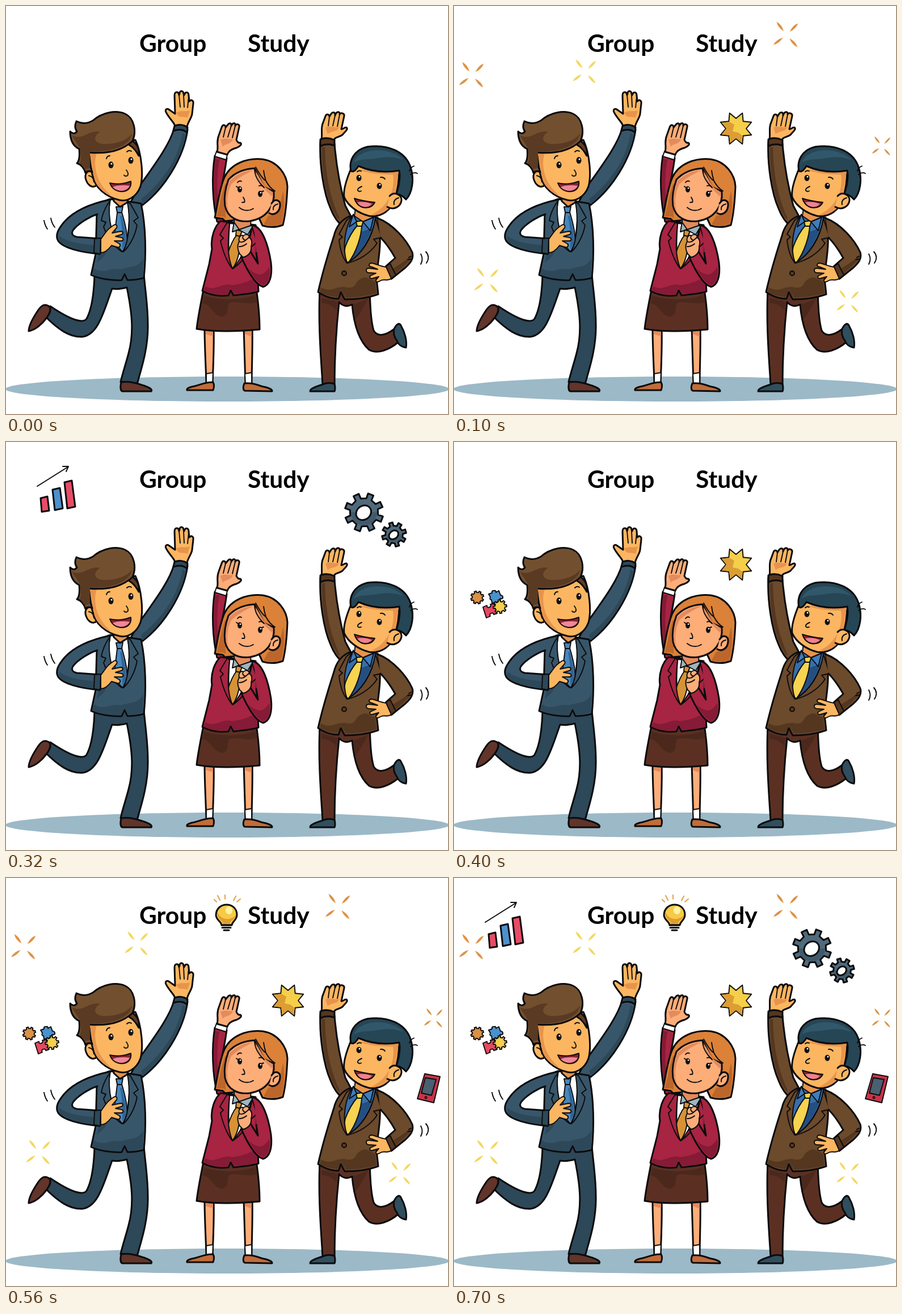
An HTML page for the animation above (0.8 s loop, 779 px wide and 719 px high).

```html
<!DOCTYPE html>
<html lang="en">
<head>
<meta charset="utf-8">
<title>Group Study</title>
<style>
html, body { margin: 0; width: 100%; height: 100%; overflow: hidden; background: #fff; }
svg { display: block; }
path, circle, ellipse, polygon { stroke: #0b0b0d; stroke-width: 3; stroke-linejoin: round; stroke-linecap: round; }
.flat, .flat * { stroke: none; }
.thin, .thin * { stroke-width: 1.9; }
.line, .line * { fill: none; }
.blue { fill: #38566a; } .blueDark { fill: #2d4858; }
.skin { fill: #fcb661; } .skinDark { fill: #e7944d; }
.rose { fill: #fcad78; } .roseDark { fill: #e38b5c; }
.wine { fill: #a72442; } .wineDark { fill: #851b36; }
.brown { fill: #6c4a2c; } .brownDark { fill: #553720; }
.choc { fill: #5b3022; } .chocDark { fill: #4c281c; }
.navy { fill: #264655; } .white { fill: #fff; }
text { font: bold 42.5px Carlito, Lato, sans-serif; }
</style>
</head>
<body>
<svg width="779" height="719" viewBox="0 0 779 719">
<ellipse class="flat" cx="390" cy="675" rx="391" ry="22" fill="#9cb9c7"/>
<text x="235" y="81">Group</text>
<text x="426" y="81">Study</text>

<g id="leftMan">
  <path class="blue" d="M296 216C290 240 268 272 236 316L220 345L239 352C276 325 313 270 320 218"/>
  <path class="flat blueDark" d="M317 228C309 270 276 322 241 349L238 340C276 310 304 270 311 224Z"/>
  <path class="blueDark" d="M295 220L297 211C304 207 313 209 320 214L319 223C312 217 304 217 295 220Z"/>
  <path class="skin" d="M298 211C295 204 288 198 283 189C279 183 283 179 288 183L298 190L297 158C297 150 304 150 305 157L306 154C306 148 313 149 313 155L314 157C316 150 322 151 322 158L323 168C326 164 331 166 330 172L328 190C327 198 321 203 319 213C313 209 304 208 298 211Z"/>
  <path class="flat skinDark" d="M300 188C308 183 317 187 324 184L320 197C312 193 305 200 300 188Z"/>
  <path class="line thin" d="M305 157L307 178M313 157L314 178M322 160L320 179"/>

  <path class="blueDark" d="M156 474C155 505 152 533 142 551C136 560 115 554 78 529L68 546C92 570 112 584 134 583C162 580 172 540 187 498C195 500 205 498 213 496C222 540 226 575 216 612C210 635 205 648 202 663C212 661 222 664 231 666C240 635 251 600 250 560C250 530 246 505 243 474Z"/>
  <path fill="#62342a" d="M77 530C68 523 62 528 56 537C46 552 40 564 40 573C52 571 64 560 72 549C77 542 80 536 77 530Z"/>
  <path fill="#62342a" d="M203 663C201 672 202 678 205 679L256 679C259 675 250 671 240 668C230 664 215 661 203 663Z"/>

  <path class="blue" d="M184 340C172 344 162 350 160 365L158 437L150 474C165 481 188 484 204 483L209 472L214 483C225 483 236 481 243 479C247 440 247 390 238 348L213 344Z"/>
  <path class="flat blueDark" d="M154 462C172 474 185 460 202 464C218 458 234 462 242 444L241 476C230 480 222 481 216 481L209 470L203 481C185 482 165 478 153 473ZM163 437L178 432C173 444 165 448 160 452Z"/>
  <path class="white thin" d="M184 341C176 378 188 420 206 433C217 410 219 370 215 345Z"/>
  <path class="thin" fill="#4887bd" d="M196 364L204 363C210 383 215 405 213 418L206 433C196 426 191 416 191 405Z"/>
  <path class="flat" fill="#316594" d="M201 370C205 390 206 412 205 430L211 418C213 404 208 385 204 370Z"/>
  <path class="thin" fill="#4887bd" d="M194 354L206 353L204 364L196 364Z"/>
  <path class="blue thin" d="M214 346L219 348L233 373L225 379L231 386C227 408 216 425 207 433C218 408 219 372 214 346ZM183 343C175 355 170 365 168 378L176 381L172 389C178 407 191 424 204 433C187 410 179 375 183 343Z"/>

  <path class="blue" d="M161 367C145 372 126 385 119 394C114 401 117 405 125 407L166 410L165 437C130 434 100 426 92 414C86 404 92 393 103 380C120 361 150 348 184 341"/>
  <path class="flat blueDark" d="M94 405C110 418 140 420 164 422L163 435C132 432 104 425 94 414Z"/>
  <path class="blueDark thin" d="M156 410L167 409L166 437L155 435Z"/>
  <path class="skin thin" d="M167 411L175 400C178 395 184 390 190 386C195 383 198 389 193 393L187 400L202 397C207 397 207 402 203 403L193 406L204 408C208 410 207 414 203 414L191 414L200 419C203 422 200 426 196 425L186 422C180 430 174 435 167 435Z"/>

  <path class="skinDark" d="M189 332L190 344L201 354L214 346L215 336Z"/>
  <path class="skin" d="M158 296C148 286 139 292 140 303C143 316 152 322 160 316"/>
  <path class="line thin" d="M146 299Q154 300 155 310"/>
  <path class="skin" d="M146 255C148 275 150 290 153 300C157 320 175 336 200 342C214 345 230 337 237 318C242 300 240 262 228 236Z"/>
  <path class="flat skinDark" d="M148 259L160 259C153 280 158 312 186 334C170 328 157 316 155 301Z"/>
  <path fill="#5d3d25" d="M221 236C231 243 236 251 234 264C230 257 226 250 216 244Z"/>
  <path fill="#72502f" d="M145 258C147 275 149 285 152 293C146 289 141 292 140 294C137 283 131 279 125 277C130 272 130 262 129 252C118 247 113 236 113 221C118 226 122 225 125 221C121 216 121 210 124 203C136 209 146 206 153 202C170 187 194 183 210 190C227 198 230 222 223 238C208 252 185 262 145 258Z"/>
  <path class="flat" fill="#5a3a22" d="M116 228C135 238 148 216 166 222C152 230 155 243 172 243C192 244 212 238 222 225C220 244 190 259 148 256L148 285L139 288L130 276C134 266 131 256 130 250Z"/>
  <g class="flat" fill="#111"><ellipse cx="185" cy="280" rx="4.5" ry="6"/><ellipse cx="220" cy="272" rx="4.5" ry="6"/></g>
  <g class="flat white"><circle cx="186" cy="278" r="1.5"/><circle cx="221" cy="270" r="1.5"/></g>
  <path class="line thin" d="M177 269Q178 264 183 264M213 257Q217 253 221 256M212 289Q217 295 214 299Q210 301 208 298"/>
  <path class="thin" fill="#8c2330" d="M183 312C195 315 210 313 220 309C222 322 212 328 202 327C192 326 186 320 183 312Z"/>
  <path class="flat" fill="#ed899a" d="M188 319C198 315 210 316 218 317C212 328 196 328 188 319Z"/>

  <path class="line thin" d="M67 378Q69 388 73 393M79 374Q81 384 86 390"/>
</g>

<g id="woman">
  <path class="wine" d="M368 264C362 300 364 345 372 380L400 385L377 332C382 310 386 290 389 268"/>
  <path class="flat wineDark" d="M369 270L376 270C370 305 372 340 378 372L374 376C366 342 365 305 369 270Z"/>
  <path class="white thin" d="M371 256L390 262L388 271L368 265Z"/>
  <path class="rose" d="M372 257C375 248 370 240 375 228L380 214C382 208 387 209 387 214L391 209C394 205 398 207 397 211C400 205 405 205 404 211C407 206 412 209 411 213L406 236C408 240 410 242 413 241C417 243 412 248 406 250C398 252 392 256 390 262Z"/>
  <path class="flat roseDark" d="M378 236C386 231 394 236 400 234C398 244 386 242 382 248Z"/>
  <path class="line thin" d="M387 214L383 231M397 211L391 231M404 211L399 232"/>

  <path class="rose" d="M350 568C350 600 352 630 353 665L364 665C365 640 367 600 366 568ZM419 568L422 666L433 666C433 640 435 600 434 568Z"/>
  <path class="flat roseDark" d="M352 572H365V582L352 578ZM421 572H433V583L421 578Z"/>
  <path class="white thin" d="M353 648L365 646L364 665L353 665ZM421 648L433 646L433 666L422 666Z"/>
  <path fill="#c26c3a" d="M365 663C352 662 345 667 332 670C322 672 318 674 319 677L365 677C367 672 367 667 365 663ZM420 665C417 672 418 677 421 678L469 679C470 675 460 672 450 670C440 666 430 664 420 665Z"/>
  <path class="choc" d="M348 500C343 525 338 550 336 569C370 575 415 573 447 570C447 545 445 525 441 498Z"/>
  <path class="flat chocDark" d="M349 510C380 520 420 518 440 508L442 522C420 528 408 518 393 524C388 535 395 545 380 548C365 545 360 525 346 524Z"/>

  <path class="wine" d="M378 379C368 388 360 408 363 428L358 455L346 502C360 510 378 512 392 510L396 501L401 510C418 508 434 507 445 503L443 470L440 386Z"/>
  <path class="flat wineDark" d="M352 494C370 504 381 486 398 492C418 490 430 484 441 478L443 501C430 505 415 507 403 508L396 498L390 508C372 510 358 506 348 501Z"/>
  <path class="white thin" d="M394 383C393 405 389 440 400 463C414 450 428 410 434 387Z"/>
  <path class="thin" fill="#d69335" d="M406 404L412 405C413 425 411 446 400 462C392 456 389 446 391 436C396 420 400 412 406 404Z"/>
  <path class="thin" fill="#d69335" d="M406 394L416 397L412 406L405 404Z"/>
  <path class="thin" fill="#9db6bf" d="M402 381L399 398L410 394L426 403L435 388Z"/>
  <path class="wine thin" d="M390 381L377 403L383 409L378 414C383 435 391 453 399 463C388 436 392 408 394 384ZM434 390L442 416L432 425C424 442 411 455 400 463C418 440 430 414 434 390Z"/>
  <path class="wine" d="M437 387C452 392 462 420 467 452C470 478 464 492 453 495C440 492 425 466 415 443L431 433L444 454L441 435"/>
  <path class="flat wineDark" d="M464 460C467 478 461 490 453 492C444 489 434 475 427 462C444 478 454 476 464 460Z"/>
  <path class="rose thin" d="M412 437C407 428 408 420 411 415C409 408 414 402 418 405C424 400 430 404 428 408C434 410 434 418 432 424C433 434 428 440 418 443Z"/>
  <path class="line thin" d="M411 415Q417 418 422 413M418 405Q415 410 422 413L428 408M411 424Q418 424 424 419"/>

  <path fill="#db8138" d="M368 373C373 350 376 322 385 302C396 278 425 267 452 270C480 274 495 298 496 318C495 345 492 370 488 386C475 391 462 390 452 387L446 374L386 379L382 375Z"/>
  <path class="flat" fill="#bd662b" d="M371 371C378 350 380 325 387 312L387 374L383 371ZM462 370C478 366 484 350 488 326C493 345 489 370 486 384C474 388 462 388 454 385Z"/>
  <path class="roseDark thin" d="M403 372L402 381L411 394L431 387L432 374Z"/>
  <path class="rose" d="M392 306C404 293 420 287 438 286L455 319L472 327C474 352 460 374 430 379C408 382 390 372 386 352C384 338 387 320 392 306Z"/>
  <path class="flat roseDark" d="M393 309C405 297 420 290 436 289C420 297 408 304 397 314C389 330 388 350 393 364C386 354 386 328 393 309ZM440 291L457 319L470 328L469 336C458 326 446 314 440 291Z"/>
  <path class="rose" d="M468 348C474 338 484 342 483 352C482 364 472 370 464 365"/>
  <path class="line thin" d="M479 349Q470 351 471 359M438 286Q438 304 455 320M440 284Q451 304 458 308Q455 298 454 290M458 308Q465 321 474 326"/>
  <g class="flat" fill="#111"><ellipse cx="412" cy="323" rx="4" ry="5.5"/><ellipse cx="448" cy="331" rx="4" ry="5.5"/></g>
  <g class="flat white"><circle cx="413" cy="321" r="1.3"/><circle cx="449" cy="329" r="1.3"/></g>
  <path class="line thin" d="M409 320L406 318M451 327L454 326M408 311Q411 307 415 309M446 317Q450 315 454 319M418 337Q422 343 420 346L416 346M411 355C418 361 428 362 436 357"/>
</g>

<g id="rightMan">
  <path class="brown" d="M554 239C552 280 560 330 572 357C577 370 585 382 595 390L612 378L598 352C588 315 582 280 579 243"/>
  <path class="flat brownDark" d="M557 248L562 249C563 300 572 340 588 374L586 376C566 350 556 300 557 248Z"/>
  <path class="brownDark" d="M554 235C562 231 572 232 579 236L579 246C571 243 562 243 554 247Z"/>
  <path class="skin" d="M556 234C558 225 554 215 559 205L563 194C565 189 570 191 570 195L573 190C576 186 581 187 580 193C582 185 589 185 588 191C590 187 597 189 596 194L591 217C594 218 596 213 600 214C604 217 597 222 593 227C587 232 580 230 578 236C570 232 563 232 556 234Z"/>
  <path class="flat skinDark" d="M563 214C571 210 579 215 587 213C584 224 573 219 567 226Z"/>
  <path class="line thin" d="M570 195L568 211M580 193L576 211M588 191L584 212"/>

  <path class="choc" d="M553 500C550 560 555 620 558 667C565 664 572 664 579 667C579 615 582 570 587 522C595 530 603 530 610 526C613 560 622 590 640 606C655 614 675 606 692 592L683 570C670 580 655 584 648 572C643 555 642 530 641 500Z"/>
  <path class="flat chocDark" d="M556 514L584 521L583 536C574 528 564 522 556 524ZM612 526L638 516C628 536 620 548 616 552Z"/>
  <path fill="#304f5e" d="M558 667C548 670 535 674 536 679L579 679C581 674 580 670 579 666C570 663 564 664 558 667ZM684 569C688 561 693 557 696 563C703 575 707 590 705 602C698 601 692 598 689 590C684 583 682 577 684 569Z"/>

  <path class="brown" d="M604 371C590 378 582 388 578 405C570 430 560 460 550 504C563 513 576 516 586 516L590 504L597 517C618 517 640 514 656 508L653 480C655 450 662 425 658 392L655 373Z"/>
  <path class="flat brownDark" d="M555 496C575 507 582 491 602 496C622 498 610 482 634 478L651 486L653 506C638 511 618 514 599 514L590 500L584 513C570 512 560 508 553 503Z"/>
  <path class="thin" fill="#356fad" d="M611 369C597 388 590 425 601 453C625 440 645 410 652 372Z"/>
  <path class="flat" fill="#244f81" d="M645 392C636 418 622 438 605 449L625 398Z"/>
  <path class="thin" fill="#f7d351" d="M619 387L627 388C626 404 619 432 603 453C596 446 595 434 598 424C604 408 611 396 619 387Z"/>
  <path class="thin" fill="#f7d351" d="M617 380L630 378L627 388L619 388Z"/>
  <path class="thin" fill="#3f7dbd" d="M612 367L605 389L618 380ZM648 372L642 396L629 380Z"/>
  <path class="brown thin" d="M610 370L600 378L587 402L593 407L587 412C589 430 594 445 601 453C591 422 599 388 610 370ZM651 374L662 408L648 411L654 418C642 436 621 449 601 453C628 438 646 408 651 374Z"/>
  <circle class="brownDark thin" cx="596" cy="471" r="4"/>
  <path class="brown" d="M655 374C682 384 706 412 716 434C719 444 714 452 704 461L679 481L669 459L686 444C677 428 668 416 660 408"/>
  <path class="flat brownDark" d="M714 439C714 451 698 460 680 478L675 467C692 456 704 450 714 439Z"/>
  <path class="brownDark thin" d="M668 460L677 454L687 474L679 481Z"/>
  <path class="line thin" d="M710 443L714 441M708 447L713 446"/>
  <path class="skin thin" d="M670 460C660 459 652 454 644 453C638 454 639 459 645 460L655 464L639 462C633 463 634 469 639 470L652 471L643 475C639 478 642 481 646 480L657 477L652 483C651 487 656 487 660 484C668 480 672 486 679 480Z"/>

  <path class="skinDark thin" d="M616 356L614 370L629 380L648 372L647 364Z"/>
  <path class="skin" d="M610 282C600 305 594 325 596 337C603 352 620 365 640 370C660 373 680 360 685 340C692 320 693 300 693 286Z"/>
  <path class="flat skinDark" d="M620 288L692 292L684 340C680 358 660 371 644 368C676 352 686 322 682 297C660 297 638 295 620 288Z"/>
  <path class="navy" d="M608 291C604 274 612 254 637 248C672 243 704 256 713 284C720 305 716 330 705 341C700 335 694 332 688 331C692 318 696 302 693 290C670 294 644 292 621 282C617 289 612 293 608 291Z"/>
  <path class="flat" fill="#31576a" d="M613 276C618 259 645 250 672 256C684 259 694 264 700 271C686 266 672 265 656 268C640 271 624 268 613 276Z"/>
  <path class="skin" d="M676 335C684 326 698 332 697 343C695 355 682 360 672 354"/>
  <path class="line thin" d="M692 338Q682 341 684 350M711 291Q712 285 719 282M713 297Q719 292 725 295"/>
  <g class="flat" fill="#111"><ellipse cx="622" cy="303" rx="4.5" ry="5.5"/><ellipse cx="658" cy="317" rx="4.5" ry="5.5"/></g>
  <g class="flat white"><circle cx="623" cy="301" r="1.4"/><circle cx="659" cy="315" r="1.4"/></g>
  <path class="line thin" d="M619 292Q622 289 626 291M660 302Q665 301 668 305M627 318Q619 321 620 325Q622 328 626 326"/>
  <path class="thin" fill="#8c2330" d="M614 339C625 343 640 345 650 346C645 356 635 357 626 354C620 351 616 346 614 339Z"/>
  <path class="flat" fill="#ed8490" d="M619 346C629 344 638 346 645 349C637 357 625 355 619 346Z"/>
  <path class="line thin" d="M731 437Q736 446 731 455M740 433Q748 442 741 453"/>
</g>

<g id="sparks" class="flat"></g>
<g id="star" transform="translate(497 216)"></g>
<g id="bulb">
  <path fill="#f7cb45" d="M380 83C379 76 370 74 370 65C371 41 407 41 407 65C407 74 399 76 398 83Z"/>
  <path class="flat" fill="#df9d32" d="M373 60C370 73 384 75 383 81L395 80C396 74 405 72 405 65C399 74 379 77 373 60Z"/>
  <ellipse class="flat" cx="393" cy="57" rx="6" ry="7" fill="#fff2a8"/>
  <path class="line" d="M380 83H397M381 87.5H396M384 92H393"/>
  <path class="line" style="stroke:#e2a04c;stroke-width:2" d="M367 38L371 42M373 31L377 39M386 30V37M405 32L401 40M413 37L407 42"/>
</g>
<g id="chart">
  <path fill="#e94b66" d="M61 99L73 96L76 121L63 123ZM103 71L116 68L122 114L108 117Z"/>
  <path fill="#4c91cd" d="M82 84L95 81L100 117L86 120Z"/>
  <path class="line thin" d="M55 78L109 44M100 43L110 43L106 52"/>
</g>
<g id="gears"></g>
<g id="puzzle" class="thin">
  <path fill="#4b91cb" d="M61 268L67 266Q66 261 71 262Q74 261 74 265L79 262L82 270Q87 270 86 275Q84 277 81 276L82 281L67 284L66 278Q62 278 64 273Z"/>
  <path fill="#e64861" d="M51 291L58 288Q58 293 63 291Q66 289 64 286L71 285L76 302L70 304Q69 300 65 302Q62 304 64 307L57 310Z"/>
</g>
<g id="phone" class="thin">
  <path fill="#ca3349" d="M738 345L765 350L754 396L725 389Z"/>
  <path fill="#48606f" d="M739 352L758 355L750 383L732 379Z"/>
  <circle class="white" cx="740" cy="387" r="1.5"/>
</g>
</svg>
<script>
const $ = id => document.getElementById(id);
const add = (id, markup) => $(id).insertAdjacentHTML('beforeend', markup);

// Closed outline whose corners cycle through [share of a step, radius].
function ring(cx, cy, count, corners, turn = 0) {
  const points = [];
  for (let i = 0; i < count; i++)
    for (const [share, radius] of corners) {
      const a = (i + share) / count * 2 * Math.PI + turn;
      points.push(`${(cx + radius * Math.cos(a)).toFixed(1)},${(cy + radius * Math.sin(a)).toFixed(1)}`);
    }
  return points.join(' ');
}
const shape = (points, fill, extra = '') => `<polygon points="${points}" fill="${fill}" ${extra}/>`;
const cog = (x, y, r, inner, turn) => ring(x, y, 8, [[.08, inner], [.14, r], [.52, r], [.58, inner]], turn);

const orange = '#dd9343', yellow = '#f3d75f';
for (const [x, y, scale, color] of [
  [32, 122, 1, orange], [231, 116, .95, yellow], [586, 51, 1, orange],
  [754, 247, .75, orange], [58, 484, .98, yellow], [695, 521, .9, yellow]
]) for (const angle of [-127, -45, 48, 143])
  add('sparks', `<path fill="${color}" transform="translate(${x} ${y}) rotate(${angle}) scale(${scale})" d="M8 0Q20-4.5 29 0Q19 4.5 8 0Z"/>`);

add('star', shape(ring(0, 0, 8, [[0, 29.5], [.5, 18]], Math.PI / 8), '#f5cf49', 'class="thin"') +
  '<path class="flat" fill="#dc9d35" d="M-12-12L-25-10L-17 0L-25 10L-12 12L-10 25L0 17L10 25L12 13L4 7L-6 5L-3-7Z"/>');

for (const [x, y, r, inner, hole, turn] of [[631, 124, 34, 25, 14, .1], [684, 163, 21.5, 15.5, 9, .25]])
  add('gears', shape(cog(x, y, r, inner, turn), '#506a7b') +
    `<path class="flat" fill="#405a6b" d="M${x - inner + 2} ${y}A${inner - 2} ${inner - 2} 0 0 0 ${x + inner - 2} ${y}Z"/>` +
    `<ellipse class="white" cx="${x - 1}" cy="${y}" rx="${hole}" ry="${hole - 2}" transform="rotate(-40 ${x} ${y})"/>`);

add('puzzle', shape(cog(41, 274, 11.5, 9, .2), '#db9141') + shape(cog(81, 290, 12, 9, .4), '#f4d04c'));

// One digit per 100 ms of the loop.
const shown = {
  sparks: '01000111', star: '01001111', bulb: '00000111', chart: '00110001',
  gears: '00110001', puzzle: '00001101', phone: '00000101'
};
const start = performance.now();
function draw(now) {
  const step = Math.floor(Math.max(0, now - start) % 800 / 100);
  for (const id in shown) $(id).style.display = shown[id][step] === '1' ? '' : 'none';
  requestAnimationFrame(draw);
}
draw(start);
</script>
</body>
</html>
```
